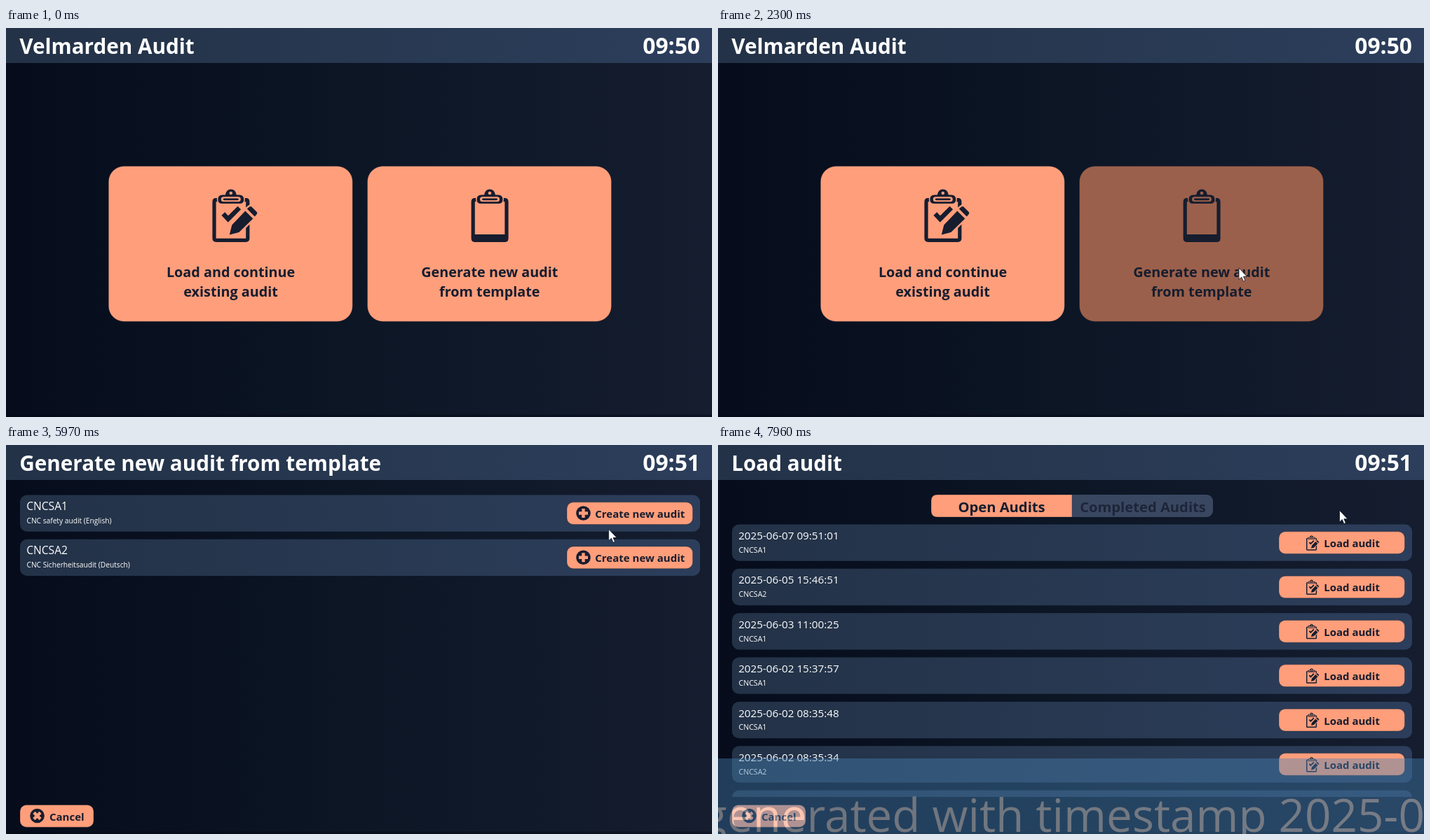
An HTML page for the animation above (8000 ms loop, 1007x556 px).

```html
<!DOCTYPE html>
<html lang="en">
<head>
<meta charset="utf-8">
<title>Audit</title>
<style>
  html, body { margin: 0; width: 100%; height: 100%; overflow: hidden; background: #0a1220; }
  svg { display: block; width: 100%; height: 100%; color: #ff9e7b; }
  text { font-family: "Open Sans", "Noto Sans", sans-serif; fill: #fff; white-space: pre; }
  .bold { font-weight: 700; }
  .dark { fill: #161d2f; }
  .mid { text-anchor: middle; }
</style>
</head>
<body>
<svg id="stage" viewBox="0 0 1007 556"></svg>
<script>
// The button colour is inherited as currentColor, so icons follow their button's shade
const ORANGE = 'currentColor', DARK = '#161d2f', LOOP = 8000;

const text = (x, y, size, str, cls = '') =>
  `<text x="${x}" y="${y}" font-size="${size}" class="${cls}">${str}</text>`;
const box = (x, y, w, h, r, fill, extra = '') =>
  `<rect x="${x}" y="${y}" width="${w}" height="${h}" rx="${r}" fill="${fill}" ${extra}/>`;
const button = (x, y, w, h, r) =>
  box(x, y, w, h, r, ORANGE, `stroke="${DARK}" stroke-opacity=".35"`);
const stroke = (d, color, width, extra = '') =>
  `<path d="${d}" fill="none" stroke="${color}" stroke-width="${width}" ${extra}/>`;
const title = str => text(19.2, 37, 29.7, str, 'bold');

// Clipboard parts in a 64 x 76 icon space
const clipShape = 'M8 15Q8 8.500 14.500 8.500H18.500Q20 0.500 26.500 0.500T34.500 8.500H38.500Q45 8.500 45 15 45 21 39 21H14Q8 21 8 15Z';
const clip = stroke(clipShape, ORANGE, 3) + `<path d="${clipShape}" fill="${DARK}"/>
  <circle cx="26.500" cy="6" r="2.300" fill="${ORANGE}"/>
  ${box(12.5, 11.3, 28, 7, 3.5, ORANGE)}${box(15.5, 13.4, 22, 2.8, 1.4, DARK)}`;
const sides = stroke('M8 15.700H5.500Q2.700 15.700 2.700 18.500V70.500Q2.700 73.300 5.500 73.300H47.700Q50.500 73.300 50.500 70.500V18.500Q50.500 15.700 47.700 15.700H45', DARK, 5.2);
const blankIcon = sides + box(1, 65, 51.5, 10.5, 3, DARK) + clip;
const pencil = 'M24.500 65.500L28 51.500 47 31.500 58 42.500 38 62ZM49.500 28.500L53 25.500Q54.500 24.500 56 25.500L63.500 33Q64.500 34.500 63.500 36L60.500 39.500Z';
const editIcon = sides + clip +
  stroke(pencil, ORANGE, 5, 'stroke-linejoin="round"') +
  `<path d="${pencil}" fill="${DARK}"/>` +
  stroke('M15.500 35.500L22.500 43 38.500 27', DARK, 6.6);
const place = (x, y, scale, art) => `<g transform="translate(${x} ${y}) scale(${scale})">${art}</g>`;

const roundIcon = (x, y, angle) => `<g transform="translate(${x} ${y}) rotate(${angle})">
  <circle r="10.300" fill="${DARK}"/>${stroke('M-6.500 0H6.500M0 -6.500V6.500', ORANGE, 4.4)}</g>`;
const card = (x, icon, line1, line2, id) => `<g id="${id}">
  ${button(x, 197.5, 348, 222, 22)}${place(x + 148, 230, 1, icon)}
  ${text(x + 174.3, 356, 19.8, line1, 'bold dark mid')}
  ${text(x + 174.3, 384, 19.8, line2, 'bold dark mid')}</g>`;
const row = (y, head, headSize, sub, subSize, action, id) =>
  box(20, y, 970, 52.3, 10, 'url(#panel)') +
  text(29.2, y + 21.6, headSize, head) + text(29.5, y + 40.4, subSize, sub) +
  `<g id="${id}">${button(800, y + 10.3, 179.5, 31.7, 9)}${action(y)}</g>`;
const createAction = y => roundIcon(823.5, y + 26, 0) +
  text(840.3, y + 32.6, 15, 'Create new audit', 'bold dark');
const loadAction = y => place(839, y + 15.5, 0.285, editIcon) +
  text(864.2, y + 32.6, 15, 'Load audit', 'bold dark');
const cancel = button(20, 514.5, 105, 31.7, 9) + roundIcon(44.5, 530, 45) +
  text(62, 537, 15, 'Cancel', 'bold dark');

const audits = [
  ['2025-06-07 09:51:01', 'CNCSA1'], ['2025-06-05 15:46:51', 'CNCSA2'],
  ['2025-06-03 11:00:25', 'CNCSA1'], ['2025-06-02 15:37:57', 'CNCSA1'],
  ['2025-06-02 08:35:48', 'CNCSA1'], ['2025-06-02 08:35:34', 'CNCSA2'], ['', '']
];

const gradient = (id, ...colors) => `<linearGradient id="${id}">${colors.map((c, i) =>
  `<stop offset="${i / (colors.length - 1)}" stop-color="${c}"/>`).join('')}</linearGradient>`;

const stage = document.getElementById('stage');
stage.innerHTML = `<defs>
    ${gradient('back', '#060c1b', '#0c1625', '#151d2f')}
    ${gradient('panel', '#233247', '#2c3e5b')}
    <clipPath id="list"><path d="M0 100H1007V503H0Z"/></clipPath>
  </defs>
  ${box(0, 0, 1007, 556, 0, 'url(#back)')}
  ${box(0, 552.5, 1007, 3.5, 0, 'rgba(3,8,18,.45)')}
  ${box(0, 0, 1007, 50, 0, 'url(#panel)')}
  <g id="home">
    ${title('Velmarden Audit')}
    ${card(146.3, editIcon, 'Load and continue', 'existing audit', 'resume')}
    ${card(515.5, blankIcon, 'Generate new audit', 'from template', 'generate')}
  </g>
  <g id="templates">
    ${title('Generate new audit from template')}
    ${row(71.5, 'CNCSA1', 15.6, 'CNC safety audit (English)', 10.2, createAction, 'create')}
    ${row(134.7, 'CNCSA2', 15.6, 'CNC Sicherheitsaudit (Deutsch)', 10.2, createAction, 'createOther')}
    <g id="edge">${stroke('M803 111.300H977', '#ffb497', 1.6)}${stroke('M808 110.700H853', '#8a5646', 1.2)}</g>
    ${cancel}
  </g>
  <g id="load">
    ${title('Load audit')}
    ${box(304, 71, 402, 32, 9, '#3a4761')}
    <path d="M505 71H313Q304 71 304 80V94Q304 103 313 103H505Z" fill="${ORANGE}" stroke="${DARK}" stroke-opacity=".35"/>
    ${text(404.5, 95.5, 20.2, 'Open Audits', 'bold dark mid')}
    <g opacity=".8">${text(606, 95.5, 20.2, 'Completed Audits', 'bold dark mid')}</g>
    <g clip-path="url(#list)">${audits.map(([date, name], i) =>
      row(113.5 + 63.35 * i, date, 15.2, name, 10.6, loadAction, 'audit' + i)).join('')}</g>
    ${cancel}
    <g id="toast">
      ${box(0, 0, 1007, 164, 0, 'steelblue')}
      ${text(-23, 105, 65.5, 'generated with timestamp 2025-06-07 09:51:01')}
    </g>
  </g>
  <text id="clock" x="908.300" y="37" font-size="31.800" class="bold"></text>
  <path id="cursor" d="M0 0V16.500L3.800 13 6.300 19 8.900 18 6.400 12.200H11.500Z" fill="#fff" stroke="#111827" stroke-width=".8"/>`;

const el = id => document.getElementById(id);
const show = (id, on) => el(id).style.display = on ? '' : 'none';

// Keys are [time, value, ...]; values are held outside the key range
function track(keys, t) {
  const i = keys.findIndex(k => k[0] > t);
  if (i === 0) return keys[0].slice(1);
  if (i < 0) return keys[keys.length - 1].slice(1);
  const [a, b] = [keys[i - 1], keys[i]];
  const u = (t - a[0]) / (b[0] - a[0]);
  return a.slice(1).map((v, j) => v + (b[j + 1] - v) * u);
}

const pointer = [
  [460, 958, 543], [700, 900, 490], [900, 825, 420], [1080, 768, 365], [1220, 745, 345], [1360, 743, 343],
  [2490, 743, 343], [2630, 734, 338], [2830, 785, 365], [3030, 776, 352],
  [5420, 776, 352], [5560, 750, 330], [5700, 765, 260], [5830, 812, 175], [5970, 859.5, 120.5],
  [6110, 880, 100], [6250, 886.5, 93.5]
];
const shades = {
  generate: [[880, 1], [1200, 0.8], [2100, 0.8], [2300, 0.607]],
  create: [[6000, 1], [6230, 0.8], [6710, 0.8], [7060, 0.607], [7200, 0.607], [7530, 0.8]]
};

function draw(t) {
  show('home', t < 2370);
  show('templates', t >= 2370 && t < 7600);
  show('load', t >= 7600);
  show('edge', t >= 7500);
  show('cursor', t >= 460);
  el('clock').textContent = t < 5230 ? '09:50' : '09:51';
  el('cursor').setAttribute('transform', `translate(${track(pointer, t)})`);
  for (const id in shades) {
    const [k] = track(shades[id], t);
    el(id).style.color = `rgb(${[255, 158, 123].map(c => Math.round(c * k))})`;
  }
  const [rise] = track([[7600, 0], [7960, 1]], t);
  el('toast').setAttribute('transform', `translate(0 ${556 - 108 * rise})`);
  el('toast').setAttribute('opacity', 0.42 * rise);
}

const start = performance.now();
function tick() {
  draw((performance.now() - start) % LOOP);
  requestAnimationFrame(tick);
}
tick();
</script>
</body>
</html>
```
